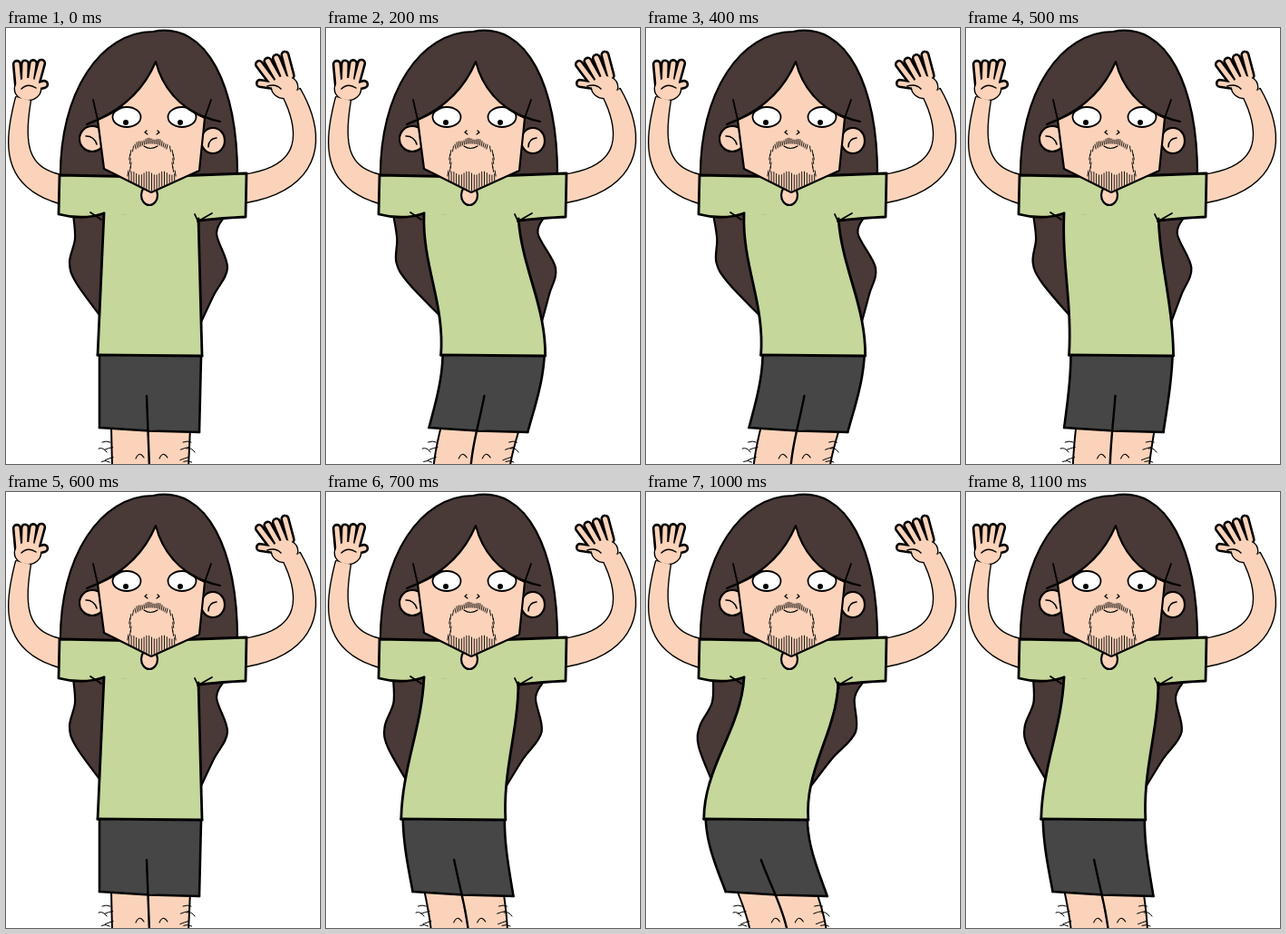
Recreate the animation shown at these times as an HTML page with a canvas. Size 346x480 px, loop 1200 ms.

```html
<!DOCTYPE html>
<html lang="en">
<head>
<meta charset="utf-8">
<title>Hip sway</title>
<style>
html, body { margin: 0; width: 100%; height: 100%; overflow: hidden; background: #fff; }
canvas { display: block; width: 346px; height: 480px; }
</style>
</head>
<body>
<canvas id="stage" width="346" height="480"></canvas>
<script>
const ctx = document.getElementById('stage').getContext('2d');
const SKIN = '#fbd3ba', HAIR = '#493937', SHIRT = '#c5d79b', SHORTS = '#464646', INK = '#000';
const LOOP = 1200, STEP = 100;
const HIP = 355, REACH = 152;
let swing = 0;

// Sideways push at height y: strongest at the hips, none at the armpits
function push(y) {
  const d = Math.min(1, Math.abs(y - HIP) / REACH);
  return swing * (1 + Math.cos(Math.PI * d)) / 2;
}

// Hips go further to the left than to the right
function swingAt(time) {
  const s = Math.sin(2 * Math.PI * time / LOOP);
  return s * Math.abs(s) ** 0.3 * (s < 0 ? 45 : 31);
}

function fill(path, color) {
  ctx.fillStyle = color;
  ctx.fill(path);
}

function ink(path, width = 2.2) {
  ctx.strokeStyle = INK;
  ctx.lineWidth = width;
  ctx.stroke(path);
}

function blob(path, color, width) {
  fill(path, color);
  ink(path, width);
}

const line = (d, width) => ink(new Path2D(d), width);

function oval(x, y, rx, ry) {
  const path = new Path2D();
  path.ellipse(x, y, rx, ry, 0, 0, Math.PI * 2);
  return path;
}

function polyline(points) {
  const path = new Path2D();
  points.forEach(([x, y]) => path.lineTo(x, y));
  return path;
}

// A straight edge bent by the sway
function edge(x0, y0, x1, y1, n = 16) {
  return Array.from({ length: n + 1 }, (_, i) => {
    const t = i / n, y = y0 + (y1 - y0) * t;
    return [x0 + (x1 - x0) * t + push(y), y];
  });
}

// Cloth or skin between two bent edges
function panel(left, right, color, width) {
  fill(polyline([...left, ...right.slice().reverse()]), color);
  ink(polyline(left), width);
  ink(polyline(right), width);
}

// Smooth lock of hair through a few points
function lock(points) {
  const p = points.map(([x, y]) => [x + push(y), y]);
  const path = new Path2D();
  path.moveTo(...p[0]);
  for (let i = 0; i < p.length - 1; i++) {
    const a = p[Math.max(0, i - 1)], b = p[i], c = p[i + 1], d = p[Math.min(p.length - 1, i + 2)];
    path.bezierCurveTo(b[0] + (c[0] - a[0]) / 6, b[1] + (c[1] - a[1]) / 6,
      c[0] - (d[0] - b[0]) / 6, c[1] - (d[1] - b[1]) / 6, ...c);
  }
  const outline = new Path2D(path);
  path.lineTo(158 + push(320), 320);
  path.lineTo(158, 205);
  fill(path, HAIR);
  ink(outline);
}

function drawHair() {
  lock([[74, 205], [76, 232], [70, 258], [77, 280], [106, 320]]);
  lock([[243, 205], [232, 226], [244, 264], [229, 294], [212, 330]]);
  blob(new Path2D('M60 168C58 70 105 4 162 4C222 -8 256 65 255 168'), HAIR);
}

// Tapered limb along a cubic curve
function limb(p, w0, w1) {
  const left = [], right = [];
  for (let t = 0; t <= 1.001; t += 0.05) {
    const u = 1 - t;
    const [x, y] = [0, 1].map(a =>
      u ** 3 * p[0][a] + 3 * u * u * t * p[1][a] + 3 * u * t * t * p[2][a] + t ** 3 * p[3][a]);
    const [dx, dy] = [0, 1].map(a => u * u * (p[1][a] - p[0][a]) +
      2 * u * t * (p[2][a] - p[1][a]) + t * t * (p[3][a] - p[2][a]));
    const w = (w0 + (w1 - w0) * t) / Math.hypot(dx, dy);
    left.push([x - dy * w, y + dx * w]);
    right.unshift([x + dy * w, y - dx * w]);
  }
  return polyline([...left, ...right]);
}

// Arm, palm and fingers share one outline
function drawArm(arm, wrist, palm, tip, tipStep, base, baseStep, thumb) {
  const solids = [limb(arm, wrist, 15), oval(...palm, 14, 12)];
  const digits = [0, 1, 2, 3].map(i => polyline([
    [base[0] + baseStep[0] * i, base[1] + baseStep[1] * i],
    [tip[0] + tipStep[0] * i, tip[1] + tipStep[1] * i]]));
  digits.push(polyline([palm, thumb]));
  for (const [color, grow] of [[INK, 1.4], [SKIN, -1.2]]) {
    ctx.strokeStyle = color;
    for (const s of solids) {
      fill(s, color);
      ctx.lineWidth = 2.8;
      if (grow > 0) ctx.stroke(s);
    }
    ctx.lineWidth = 7.5 + grow * 2;
    digits.forEach(d => ctx.stroke(d));
  }
}

function drawArms() {
  drawArm([[19, 78], [8, 130], [10, 165], [62, 178]], 8,
    [24, 67], [12, 40], [9, -0.4], [14, 62], [6.5, -1], [42, 62]);
  drawArm([[315, 72], [338, 115], [340, 165], [262, 177]], 10,
    [307, 65], [279, 40], [9.5, -3.4], [294, 60], [6.5, -2.5], [280, 61]);
  line('M17 67Q24 60 33 66M288 64Q297 61 303 67', 1.5);
}

function drawLegs() {
  const l = edge(116, 440, 117, 484), r = edge(203, 440, 201, 484);
  panel(l, r, SKIN, 2);
  for (let i = 0; i < 5; i++) {
    const y = 456 + i * 5.5, lean = 4 * Math.sin(i * 2.4);
    for (const x of [111 + lean, 200 - lean]) {
      line(`M${x + push(y) - 5} ${y + lean}q5 -2 9 ${-lean}`, 1);
    }
  }
  for (const x of [143, 169]) line(`M${x + push(472)} 474q4 -9 9 -1`, 1.1);

  const sl = edge(103, 361, 103, 440), sr = edge(215, 362, 213, 445);
  panel(sl, sr, SHORTS, 2.6);
  ink(polyline([sl.at(-1), [(sl.at(-1)[0] + sr.at(-1)[0]) / 2, 443.5], sr.at(-1)]), 2.6);
  ink(polyline(edge(155, 405, 158, 484)), 2.4);
}

function drawShirt() {
  const l = edge(108, 204, 101, 360), r = edge(212, 210, 216, 361);
  const sleeves = new Path2D('M158 164L59 162L58 205Q85 212 108 204L212 212Q240 209 264 208L265 160L158 164');
  fill(sleeves, SHIRT);
  panel(l, r, SHIRT, 2.8);
  ink(polyline([l.at(-1), r.at(-1)]), 3);
  line('M158 164L59 162L58 205Q85 212 108 204M212 212Q240 209 264 208L265 160L158 164', 2.8);
  line('M93 203L105 211M211 213L227 204M208 205L213 216', 1.8);
}

function drawBeard() {
  const wob = i => Math.sin(i * 7.3);
  const hair = (x, y, dx, dy) => line(`M${x} ${y}l${dx} ${dy}`, 0.9);
  for (let i = -9; i <= 9; i++) {
    const x = 160.5 + i * 2.8, chin = 179 - Math.abs(i) * 1.25;
    const top = 160 + wob(i) * 2;
    hair(x, top, 0, chin - top);
    hair(160 + i * 2, 122 + i * i / 13 + wob(i), -i / 8, 5 + wob(i + 3));
  }
  for (let i = 0; i < 7; i++) {
    for (const side of [-1, 1]) {
      hair(160.5 + side * (20 + i + 2 * wob(i)), 130 + i * 4.5, side, 6);
    }
  }
}

function drawHead() {
  blob(oval(158, 184, 9, 11), SKIN);
  blob(oval(95, 122, 14, 14), SKIN);
  blob(oval(228, 124, 13, 14), SKIN);
  line('M88 119Q97 119 100 128M223 131Q223 122 232 121', 1.6);

  const face = new Path2D('M165 37Q147 80 101 101L108 155L160 181L213 157L219 99Q176 80 165 37Z');
  fill(face, SKIN);
  ctx.save();
  ctx.clip(face);
  for (const [x, pupil] of [[133, 132], [194, 192]]) {
    blob(oval(x, 98, 15.5, 11), '#fff', 1.8);
    fill(oval(pupil, 104, 3, 3), INK);
  }
  ctx.restore();
  ink(face);
  line('M101 101L96 79M219 99L226 79', 1.8);
  line('M128 87Q112 97 89 106M201 89Q217 99 236 103');
  line('M155 113l-2 2l3 2M167 113l2 2l-3 2M152 130Q159 135 167 130', 1.2);
  drawBeard();
}

function draw(time) {
  swing = swingAt(Math.floor(time / STEP) * STEP % LOOP);
  ctx.fillStyle = '#fff';
  ctx.fillRect(0, 0, 346, 480);
  ctx.lineCap = ctx.lineJoin = 'round';
  drawHair();
  drawArms();
  drawLegs();
  drawShirt();
  drawHead();
}

let start;
function tick(now) {
  start ??= now;
  draw(now - start);
  requestAnimationFrame(tick);
}
draw(0);
requestAnimationFrame(tick);
</script>
</body>
</html>
```
